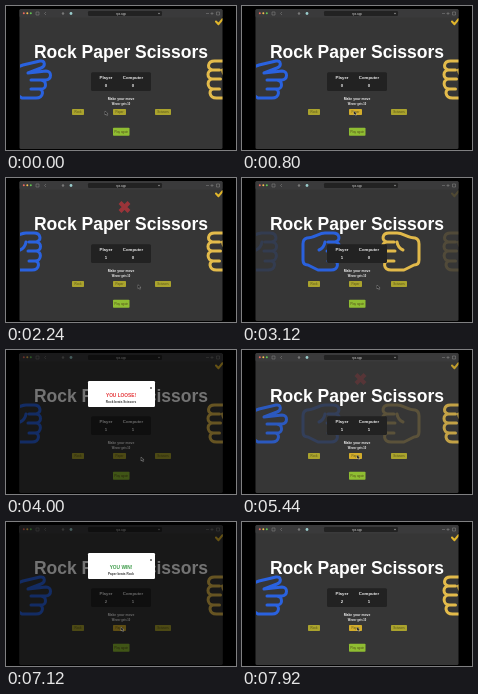
Recreate the animation shown at these times as an HTML page. Size 230 by 144 pixels, loop 8 s.

```html
<!DOCTYPE html>
<html lang="en">
<head>
<meta charset="utf-8">
<title>Rock Paper Scissors</title>
<style>
html, body { margin: 0; width: 100%; height: 100%; overflow: hidden; background: #000; }
svg { display: block; width: 230px; height: 144px; font-family: "Liberation Sans", Arial, sans-serif; }
text { text-anchor: middle; }
.bold { font-weight: bold; }
.hand { fill: none; stroke-width: 3; stroke-linecap: round; stroke-linejoin: round; }
.blue { stroke: #2a62df; }
.gold { stroke: #e3bb4b; }
</style>
</head>
<body>
<svg viewBox="0 0 230 144">
  <defs>
    <clipPath id="page"><rect x="14" y="11" width="202.5" height="132"/></clipPath>
    <path id="fist" d="M-11 64H-4C2 63 1 55-6 55H-14C-20 55-25 60-32 60Q-36 61-36 66V82Q-36 87-31 87L-21 92H-8C0 92 0 83-5 83H-11M-4 64C2 64 2 73-4 73H-12M-4 73C2 73 2 83-5 83M-14 64Q-15 70-20 72"/>
    <path id="scissors" d="M-9 74H6C12 73 12 65 6 65L-12 67 1 62C6 60 5 54 0 55L-17 59-25 62H-36V87H-26L-18 92H-4C4 92 4 83-1 83H-9M-5 74H1C7 75 7 83 1 83H-1"/>
  </defs>

  <rect x="13.5" y="3" width="203" height="140" rx="1.5" fill="#363636"/>
  <rect x="13.5" y="3" width="203" height="8.5" rx="1.5" fill="#3a3a3b"/>
  <circle cx="17.8" cy="7.3" r="1" fill="#ed6a5e"/>
  <circle cx="21.3" cy="7.3" r="1" fill="#f4be4f"/>
  <circle cx="24.8" cy="7.3" r="1" fill="#61c554"/>
  <path d="M30 6h3v3h-3zM40 6l-1.5 1.5 1.5 1.5M200 7.5h3M206 6v3M204.5 7.5h3M210.5 6h3v3h-3z" fill="none" stroke="#888" stroke-width=".5"/>
  <circle cx="57" cy="7.5" r="1.2" fill="#777"/>
  <circle cx="65" cy="7.5" r="1.4" fill="#9cc"/>
  <rect x="82" y="5" width="74" height="5" rx="1.3" fill="#222"/>
  <text x="115" y="8.6" font-size="3" fill="#ccc">rps.app</text>
  <circle cx="153" cy="7.5" r=".7" fill="#aaa"/>

  <g clip-path="url(#page)">
    <g id="side" class="hand">
      <use id="sideBlue" class="blue" x="34"/>
      <use class="gold" href="#fist" transform="translate(202.5 0) scale(-1 1)"/>
      <path d="M210 15.5l2.5 2.7 4-5" stroke="#e0b52b" stroke-width="2"/>
    </g>
    <g id="centre" class="hand">
      <use id="centreBlue" class="blue" x="97"/>
      <use class="gold" href="#fist" transform="translate(141 0) scale(-1 1)"/>
    </g>
    <path id="cross" d="M114 24.5l9 9M123 24.5l-9 9" stroke="#d2343c" stroke-width="4"/>

    <text class="bold" x="115" y="52.3" font-size="17.5" fill="#fff">Rock Paper Scissors</text>
    <rect x="85" y="66.3" width="60" height="18.7" rx="1.5" fill="#222"/>
    <g class="bold" font-size="4.3" fill="#eee">
      <text x="100" y="73">Player</text>
      <text x="127" y="73">Computer</text>
      <text id="player" x="100" y="80.6"></text>
      <text id="computer" x="127" y="80.6"></text>
      <text x="115" y="94.4" font-size="3.4">Make your move</text>
      <text x="115" y="98.6" font-size="2.6">Winner gets 10</text>
    </g>
    <g font-size="3" fill="#55521a">
      <rect x="66" y="103" width="12" height="6" rx=".8" fill="#aaa32d"/>
      <rect id="paper" x="107" y="103" width="13" height="6" rx=".8"/>
      <rect x="149" y="103" width="16" height="6" rx=".8" fill="#aaa32d"/>
      <rect x="107" y="121.7" width="16.5" height="8" rx=".8" fill="#8fbd32"/>
      <text x="72" y="107">Rock</text>
      <text x="113.5" y="107">Paper</text>
      <text x="157" y="107">Scissors</text>
      <text x="115.3" y="126.7">Play again</text>
    </g>
  </g>

  <g id="modal">
    <rect x="13.5" y="3" width="203" height="140" fill="#000" opacity=".55"/>
    <rect x="82" y="31" width="67" height="26" rx="1.2" fill="#fff"/>
    <path d="M144 37l2 2M146 37l-2 2" stroke="#333" stroke-width=".6"/>
    <text id="verdict" class="bold" x="115" y="47" font-size="4.8"></text>
    <text id="reason" class="bold" x="115" y="52.5" font-size="3.1" fill="#333"></text>
  </g>
  <path id="cursor" d="M0 0v4l1-.9.8 1.6.7-.3-.8-1.6h1.4z" fill="#111" stroke="#ddd" stroke-width=".3"/>
</svg>
<script>
const LOOP = 8000;
const $ = id => document.getElementById(id);
const set = (id, name, value) => $(id).setAttribute(name, value);

function ramp(t, start, length) {
  const p = Math.min(1, Math.max(0, (t - start) / length));
  return p * p * (3 - 2 * p);
}

// Rises from 0 to 1 after start and is back at 0 by end.
const pulse = (t, start, end, fade = 400) =>
  ramp(t, start, fade) * (1 - ramp(t, end - fade, fade));

function draw(t) {
  const first = pulse(t, 1200, 1960), second = pulse(t, 2700, 3500), third = pulse(t, 4700, 5560);
  const reveal = first + second + third;
  const late = t >= 5000;

  set("centre", "opacity", reveal);
  set("side", "opacity", 1 - .85 * reveal);
  set("centreBlue", "href", t < 2000 ? "#scissors" : "#fist");
  set("sideBlue", "href", t > 1700 && t < 5130 ? "#fist" : "#scissors");
  set("cross", "opacity", pulse(t, 1200, 2480) + third);
  $("player").textContent = t < 2000 ? 0 : t < 6240 ? 1 : 2;
  $("computer").textContent = t < 3500 ? 0 : 1;

  const away = pulse(t, 1940, 4700);
  const x = 99 + 16 * ramp(t, 300, 700) + 20 * away;
  set("cursor", "transform", `translate(${x} ${105 + 2 * away})`);
  set("paper", "fill", x > 107 && x < 120 ? "#d3ad2b" : "#aaa32d");

  set("modal", "opacity", pulse(t, 3520, 4720, 160) + pulse(t, 6320, 7600, 160));
  $("verdict").textContent = late ? "YOU WIN!" : "YOU LOOSE!";
  set("verdict", "fill", late ? "#3c9b49" : "#e5383b");
  $("reason").textContent = late ? "Paper beats Rock" : "Rock beats Scissors";
}

function frame(now) {
  draw(now % LOOP);
  requestAnimationFrame(frame);
}
draw(0);
requestAnimationFrame(frame);
</script>
</body>
</html>
```
